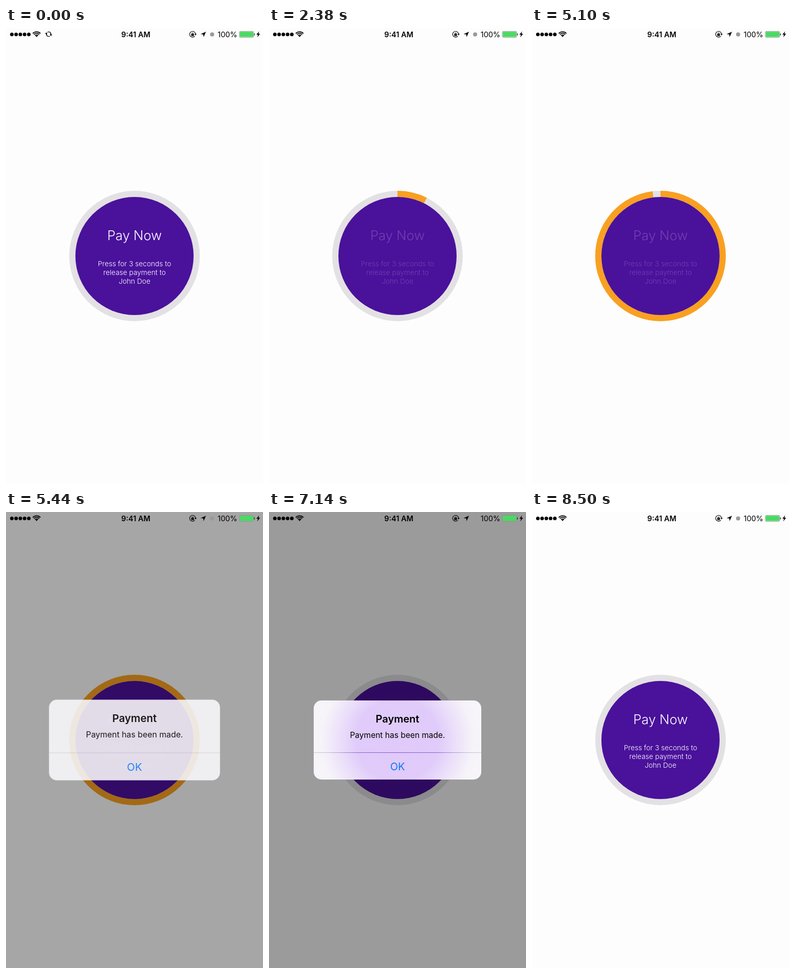
Write an HTML page with a canvas that moves like this. It is 500 by 888 pixels and loops after 8.84 s.

```html
<!DOCTYPE html>
<html lang="en">
<head>
<meta charset="utf-8">
<title>Hold to pay</title>
<style>
  html, body { margin: 0; width: 100%; height: 100%; overflow: hidden; background: #fdfdfd; }
  canvas { display: block; width: 100%; height: 100%; }
</style>
</head>
<body>
<canvas id="stage" width="500" height="888"></canvas>
<script>
const ctx = document.getElementById('stage').getContext('2d');
const W = 500, H = 888, CX = 250, CY = 444;
const LOOP = 8840, STEP = 340, TAU = Math.PI * 2;
const PRESS = 2158, HOLD = 3000, DONE = PRESS + HOLD;
const RELEASE = 5600, DISMISS = 7200, SYNC_END = 1020;
const PURPLE = '#4a119b', ORANGE = '#f9a020', TRACK = '#e3e1e4';
const FONT = 'Inter, "Liberation Sans", sans-serif';

function disc(x, y, r, color) {
  ctx.fillStyle = color;
  ctx.beginPath();
  ctx.arc(x, y, r, 0, TAU);
  ctx.fill();
}

function arc(x, y, r, from, to, width, color) {
  ctx.strokeStyle = color;
  ctx.lineWidth = width;
  ctx.beginPath();
  ctx.arc(x, y, r, from, to);
  ctx.stroke();
}

function poly(color, ...points) {
  ctx.fillStyle = color;
  ctx.beginPath();
  points.forEach(([x, y]) => ctx.lineTo(x, y));
  ctx.closePath();
  ctx.fill();
}

function roundBox(x, y, w, h, r) {
  ctx.beginPath();
  ctx.roundRect(x, y, w, h, r);
}

function text(str, x, y, size, weight, color, align = 'center') {
  ctx.font = `${weight} ${size}px ${FONT}`;
  ctx.textAlign = align;
  ctx.fillStyle = color;
  ctx.fillText(str, x, y);
}

function drawSync(x, y, turn) {
  ctx.save();
  ctx.translate(x, y);
  ctx.rotate(turn);
  for (let i = 0; i < 2; i++) {
    arc(0, 0, 4.4, -1.2, 1.2, 1.4, '#000');
    poly('#000', [-0.6, 4.4], [3, 1.8], [3, 6.6]);
    ctx.rotate(Math.PI);
  }
  ctx.restore();
}

function drawWifi(x, y) {
  const half = 0.8;
  [4.8, 8, 11].forEach(r =>
    arc(x, y, r - 0.6, -Math.PI / 2 - half, -Math.PI / 2 + half, 1.8, '#000'));
  poly('#000', [x, y], [x - 2, y - 2.4], [x, y - 3.1], [x + 2, y - 2.4]);
}

function drawLock(x, y) {
  arc(x, y, 5.7, 0.7, TAU - 0.1, 1.2, '#000');
  poly('#000', [x + 3.6, y - 0.6], [x + 8, y - 0.6], [x + 5.8, y + 2.2]);
  ctx.fillRect(x - 2.6, y - 0.7, 5.2, 4);
  arc(x, y - 0.8, 1.6, Math.PI, TAU, 1.1, '#000');
}

function drawBattery() {
  ctx.strokeStyle = '#8f8f8f';
  ctx.lineWidth = 0.8;
  roundBox(453.9, 6.4, 28, 12, 2);
  ctx.stroke();
  ctx.fillStyle = '#4cd964';
  roundBox(454.7, 7.2, 26.4, 10.4, 1.2);
  ctx.fill();
  ctx.fillStyle = '#222';
  ctx.fillRect(482.5, 10.5, 1.3, 4);
  poly('#000', [492.4, 6.6], [487.2, 13], [490.2, 13], [488.8, 18.2], [494.4, 11.3], [491.2, 11.3]);
}

function drawStatusBar(t) {
  for (let i = 0; i < 5; i++) disc(11.4 + i * 8.25, 12.4, 3.5, '#000');
  drawWifi(59.5, 17.8);
  if (t < SYNC_END) drawSync(83, 12, -0.9 + t / 1000 * TAU);
  text('9:41 AM', 252.5, 17.6, 14.4, 600, '#000');
  drawLock(363, 12.2);
  poly('#000', [389, 7.2], [378.6, 12], [383.8, 12.6], [384.4, 17.8]);
  disc(401, 12.4, 4, '#9a9a9a');
  text('100%', 450, 17.8, 14.4, 400, '#000', 'right');
  drawBattery();
}

function drawButton(t) {
  const held = t >= PRESS && t < RELEASE;
  const progress = held ? Math.min(1, (t - PRESS) / HOLD) : 0;
  disc(CX, CY, 127, TRACK);
  if (progress) arc(CX, CY, 121, -Math.PI / 2, -Math.PI / 2 + progress * TAU, 12, ORANGE);
  disc(CX, CY, 115, PURPLE);
  ctx.globalAlpha = held ? 0.2 : 1;
  text('Pay Now', CX, 413, 25.6, 300, '#fff');
  ['Press for 3 seconds to', 'release payment to', 'John Doe'].forEach((line, i) =>
    text(line, CX, 464 + i * 17, 13.7, 300, '#fff'));
  ctx.globalAlpha = 1;
}

function glow(stops) {
  const g = ctx.createRadialGradient(CX, CY, 0, CX, CY, 160);
  stops.forEach(([at, color]) => g.addColorStop(at, color));
  return g;
}

function drawAlert(t) {
  const shown = t < DONE ? 0 : 1 - Math.exp(-(t - DONE) / 130);
  const fade = t < DISMISS ? 1 : Math.exp(-(t - DISMISS) / 142);
  const alpha = shown * fade;
  if (alpha < 0.02) return;

  ctx.fillStyle = `rgba(0, 0, 0, ${0.39 * alpha})`;
  ctx.fillRect(0, 0, W, H);

  // The frosted backdrop only shows while the card is fully opaque.
  const frosted = alpha > 0.95;
  const scale = 1 + 0.18 * (1 - shown);
  ctx.save();
  ctx.globalAlpha = alpha;
  ctx.translate(CX, CY);
  ctx.scale(scale, scale);
  ctx.translate(-CX, -CY);
  ctx.fillStyle = frosted
    ? glow([[0, '#dfcafa'], [0.5, '#e0cbfa'], [0.7, '#ebdffa'], [0.92, '#f6f3f9'], [1, '#f7f5f9']])
    : '#f9f7fa';
  roundBox(87, 367, 326, 154, 15);
  ctx.fill();
  ctx.fillStyle = frosted
    ? glow([[0, '#8057cc'], [0.5, '#8a66cd'], [0.85, '#c2b8d0'], [1, '#cac7cc']])
    : 'rgba(80, 75, 90, 0.2)';
  ctx.fillRect(87, 468, 326, 1);
  text('Payment', CX, 410, 20, 600, '#000');
  text('Payment has been made.', CX, 439.5, 15.5, 400, '#000');
  text('OK', CX, 503, 20, 400, '#0a78f8');
  ctx.restore();
}

function frame(now) {
  const t = Math.floor((now % LOOP) / STEP) * STEP;
  ctx.fillStyle = '#fdfdfd';
  ctx.fillRect(0, 0, W, H);
  drawButton(t);
  drawAlert(t);
  drawStatusBar(t);
}

const start = performance.now();
function tick() {
  frame(performance.now() - start);
  requestAnimationFrame(tick);
}
tick();
</script>
</body>
</html>
```
